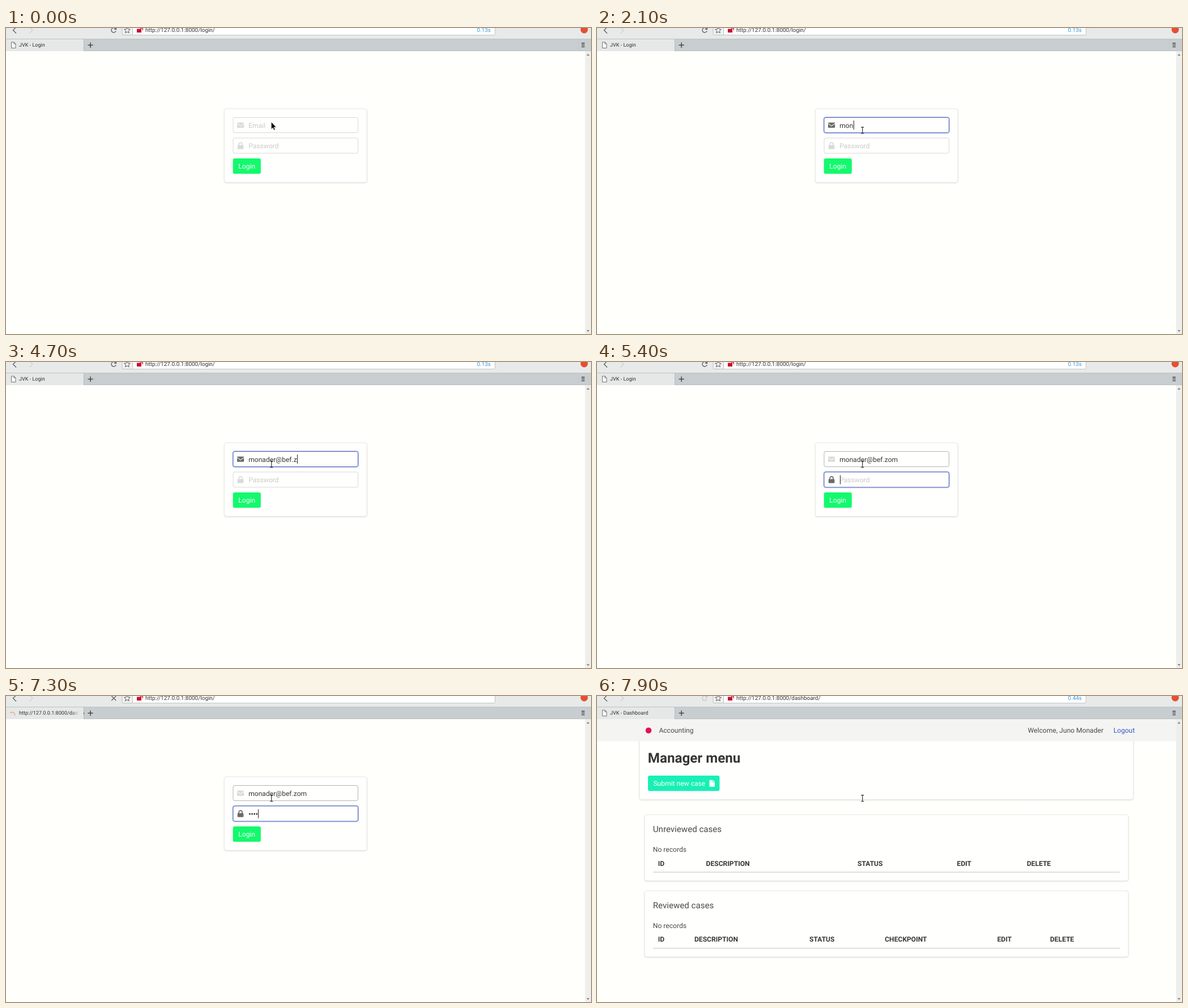
Recreate the animation shown at these times as an HTML page. Size 1033x542 px, loop 8 s.

```html
<!DOCTYPE html>
<html lang="en">
<head>
<meta charset="utf-8">
<title>Login</title>
<style>
  html, body { margin: 0; width: 100%; height: 100%; overflow: hidden; background: #fffffc; }
  svg { display: block; position: absolute; left: 0; top: 0; }
  text { font: 12.1px Roboto, sans-serif; fill: #4a4a4a; text-rendering: geometricPrecision; white-space: pre; }
  .bar { font-size: 9.95px; fill: #333; }
  .tab { font-size: 9.07px; fill: #2e2e2e; }
  .h1 { font-size: 24.2px; font-weight: 700; fill: #363636; }
  .h2 { font-size: 15.1px; }
  .th { font-weight: 700; fill: #363636; }
  .white { fill: #fff; }
  .box { fill: #fffffd; stroke: #e3e3e0; stroke-width: .8; filter: drop-shadow(0 1.4px 1.1px rgba(10, 10, 10, .13)); }
  .line { fill: none; stroke: #5c5f60; stroke-width: 1.3; }
  .frame { fill: #fffffd; stroke: #d8d8d6; }
  .glow { fill: none; stroke: #4864d8; stroke-opacity: .28; stroke-width: 3.4; visibility: hidden; }
  .icon { fill: #dadada; color: #dadada; }
  .value { fill: #363636; }
  .hover .frame { stroke: #b3b3b1; }
  .focus .frame { stroke: #465cb8; }
  .focus .glow { visibility: visible; }
  .focus .icon { fill: #6a6a6a; color: #6a6a6a; }
  .filled .value { fill: #363636; }
  .empty .value { fill: #c9c9c8; }
</style>
</head>
<body>
<svg width="1033" height="542" viewBox="0 0 1033 542">
  <rect width="1033" height="542" fill="#fffffc"/>

  <g id="chrome">
    <rect width="1033" height="19" fill="#e8eae9"/>
    <rect y="19" width="1033" height="22" fill="#c8cdd0"/>
    <path d="M0 19.5H1033M0 40.5H1033" stroke="#b9bec0" stroke-width=".8"/>
    <rect y="20" width="137" height="21" fill="#e6e8e7"/>
    <path d="M137.5 19V41" stroke="#aeb3b5" stroke-width=".8"/>
    <path class="line" d="M18-1.5L12.5 4L18 9.5"/>
    <path class="line" d="M41.5-1.5L47 4L41.5 9.5" style="stroke:#cfd1d0"/>
    <path id="reload" class="line" d="M193.7 1.4A4.2 4.2 0 1 0 194.2 5.2M194.5-1V2.3H191"/>
    <path id="stop" class="line" d="M186.3 0L194.3 8M194.3 0L186.3 8"/>
    <path d="M205-4V10.5Q205 12.5 207 12.5H223.5V-4Z" fill="#f0f1f0" stroke="#b4b8b9" stroke-width=".8"/>
    <path d="M214-1.5L215.6 2L219.3 2.4L216.5 4.9L217.3 8.7L214 6.8L210.7 8.7L211.5 4.9L208.7 2.4L212.4 2Z" fill="none" stroke="#555" stroke-width="1"/>
    <path d="M223.5-4V12.5H861.5Q863.5 12.5 863.5 10.5V-4Z" fill="#fff" stroke="#b4b8b9" stroke-width=".8"/>
    <path d="M231 1.5H239V8H231Z" fill="#c8102e"/>
    <path d="M238 2V0H241.3V4" fill="none" stroke="#c8102e" stroke-width="1.3"/>
    <text id="url" class="bar" x="246" y="7"></text>
    <text id="timing" class="bar" x="856" y="7" text-anchor="end" style="fill:#3c9bd6"></text>
    <circle cx="1021" cy="3" r="6.5" fill="#e5502f"/>
    <path id="doc" d="M9.5 25H14L17 28V35.5H9.5ZM14 25V28H17" fill="#fafafa" stroke="#666" stroke-width=".9"/>
    <path id="spinner" d="M15 25.2A5.2 5.2 0 0 0 15 34.8" fill="none" stroke="#ef9a70" stroke-width="1.2"/>
    <text id="tab" class="tab" x="23" y="33.3"></text>
    <linearGradient id="fade"><stop offset="0" stop-color="#e6e8e7" stop-opacity="0"/><stop offset=".65" stop-color="#e6e8e7"/></linearGradient>
    <rect x="115" y="22" width="22" height="17" fill="url(#fade)"/>
    <rect x="137.9" y="20" width="60" height="20" fill="#c8cdd0"/>
    <path class="line" d="M144.5 30.3H153.7M149.1 25.7V34.9" style="stroke:#333"/>
    <path class="line" d="M1016.3 27H1021.7M1016.3 30.2H1021.7M1016.3 33.4H1021.7" style="stroke:#333"/>
    <rect x="1022.5" y="41" width="10.5" height="501" fill="#eeefed"/>
    <path d="M1025 49L1027.8 45.4L1030.6 49ZM1025 535L1027.8 538.6L1030.6 535Z" fill="#8b8d8c"/>
  </g>

  <g id="login">
    <rect class="box" x="385.4" y="143" width="251.8" height="130.4" rx="3.8"/>
    <g id="email">
      <rect class="glow" x="401" y="158.5" width="220.6" height="27" rx="3"/>
      <rect class="frame" x="401" y="158.5" width="220.6" height="27" rx="3"/>
      <g class="icon">
        <path d="M408 168.4Q408 167.4 409 167.4H419.2Q420.2 167.4 420.2 168.4L414.1 172.9Z"/>
        <path d="M408 169.7L414.1 174.2L420.2 169.7V175.7Q420.2 176.7 419.2 176.7H409Q408 176.7 408 175.7Z"/>
      </g>
      <text class="value" x="428.2" y="176.8"></text>
    </g>
    <g id="password">
      <rect class="glow" x="401" y="194.9" width="220.6" height="27" rx="3"/>
      <rect class="frame" x="401" y="194.9" width="220.6" height="27" rx="3"/>
      <g class="icon">
        <rect x="408.8" y="207.6" width="10.6" height="7" rx="1"/>
        <path d="M411.2 208V205.8A2.9 2.9 0 0 1 417 205.8V208" fill="none" stroke="currentColor" stroke-width="1.7"/>
      </g>
      <text class="value" x="428.2" y="213.1"></text>
      <g id="dots" fill="#363636"></g>
    </g>
    <rect id="caret" width="1" height="16" fill="#222"/>
    <rect x="400.7" y="231" width="49.2" height="27.2" rx="3" fill="#13f96d"/>
    <text class="white" x="425.2" y="249.2" text-anchor="middle">Login</text>
  </g>

  <g id="dashboard">
    <rect class="box" x="75" y="70" width="872" height="113.4" rx="3.8"/>
    <rect y="41" width="1022.5" height="39.2" fill="#f4f4f2"/>
    <circle cx="91" cy="61" r="5.3" fill="#e4134f"/>
    <text x="109.4" y="65.3">Accounting</text>
    <text x="894.3" y="65.3" text-anchor="end">Welcome, Juno Monader</text>
    <text x="912" y="65.3" style="fill:#3c58c4">Logout</text>
    <text class="h1" x="89.8" y="118.4">Manager menu</text>
    <rect x="90" y="141" width="126.4" height="27.2" rx="3" fill="#18f0b5"/>
    <text class="white" x="99.4" y="159">Submit new case</text>
    <path d="M198.5 148.8H204V152.8H208V160.8H198.5ZM204.9 148.8L208 151.9H204.9Z" fill="#fff"/>
    <g id="tables"></g>
  </g>

  <path id="arrow" d="M468.5 166.6V179.2L471.3 176.5L473.2 180.9L475.1 180.1L473.2 175.8H477Z" fill="#000" stroke="#fff" stroke-width=".5"/>
  <path id="beam" d="M466.3 175.6H468Q468.8 175.6 468.8 176.6Q468.8 175.6 469.6 175.6H471.3M468.8 176.2V186M466.3 186.5H468Q468.8 186.5 468.8 185.6Q468.8 186.5 469.6 186.5H471.3" fill="none" stroke="#222" stroke-width="1.1"/>
</svg>
<script>
const LOOP = 8000;
const ADDRESS = "monader@bef.zom";
const HOST = "http://127.0.0.1:8000/";

// time, number of characters in the field
const EMAIL_KEYS = [[1800, 1], [2000, 2], [2100, 3], [2200, 4], [2300, 5], [2500, 6], [2700, 7],
  [3400, 8], [4000, 9], [4200, 10], [4300, 11], [4700, 13], [4900, 14], [5200, 15]];
const PASS_KEYS = [[6000, 1], [6400, 2], [6700, 3], [6900, 4]];
// time, caret shown
const CARET = [[0, 0], [1000, 1], [1500, 0], [1800, 1], [3200, 0], [3400, 1], [3900, 0], [4000, 1],
  [5800, 0], [6000, 1], [7400, 0]];

const $ = id => document.getElementById(id);
const show = (id, on) => { $(id).style.visibility = on ? "visible" : "hidden"; };
const at = (steps, t) => steps.reduce((v, [time, next]) => t >= time ? next : v, 0);
const put = (el, s) => { if (el.textContent !== s) el.textContent = s; };

function add(parent, tag, attrs, content = "") {
  const el = document.createElementNS("http://www.w3.org/2000/svg", tag);
  for (const key in attrs) el.setAttribute(key, attrs[key]);
  el.textContent = content;
  parent.append(el);
  return el;
}

function addTable(y, title, columns) {
  const g = add($("tables"), "g", { transform: `translate(0 ${y})` });
  add(g, "rect", { class: "box", x: 84, y: 0, width: 854.2, height: 117, rx: 3.8 });
  add(g, "text", { class: "h2", x: 98.8, y: 30.6 }, title);
  add(g, "text", { x: 98.8, y: 66 }, "No records");
  for (const [x, name] of columns) add(g, "text", { class: "th", x, y: 90.3 }, name);
  add(g, "path", { d: "M99 101.7H923", stroke: "#d6d6d4", "stroke-width": 1.5 });
}

addTable(210.3, "Unreviewed cases",
  [[107.8, "ID"], [192.6, "DESCRIPTION"], [460, "STATUS"], [635.6, "EDIT"], [759, "DELETE"]]);
addTable(345.1, "Reviewed cases",
  [[107.8, "ID"], [172, "DESCRIPTION"], [375, "STATUS"], [508.2, "CHECKPOINT"], [706.8, "EDIT"], [800, "DELETE"]]);

const PITCH = 4.15;
const dots = [0, 1, 2, 3].map(i => add($("dots"), "circle", { cx: 430.4 + i * PITCH, cy: 209, r: 1.45 }));
const emailText = $("email").querySelector("text");
const passText = $("password").querySelector("text");

function render(t) {
  const inEmail = t >= 300 && t < 5400;
  const inPass = t >= 5400;
  const typed = at(EMAIL_KEYS, t);
  const marks = at(PASS_KEYS, t);
  const loading = t >= 7300 && t < 7900;
  const arrived = t >= 7800;

  $("email").setAttribute("class", (inEmail ? "focus " : inPass ? "hover " : "") + (typed ? "filled" : "empty"));
  $("password").setAttribute("class", (inPass ? "focus " : "") + "empty");
  put(emailText, typed ? ADDRESS.slice(0, typed) : "Email");
  put(passText, marks ? "" : "Password");
  dots.forEach((dot, i) => dot.setAttribute("display", i < marks ? "inline" : "none"));

  $("login").style.display = arrived ? "none" : "inline";
  $("dashboard").style.display = arrived ? "inline" : "none";

  const caretX = inPass ? 428.6 + marks * PITCH : 428.6 + (typed && !arrived ? emailText.getComputedTextLength() : 0);
  $("caret").setAttribute("x", Math.round(caretX));
  $("caret").setAttribute("y", inPass ? 200.5 : 164);
  show("caret", !arrived && at(CARET, t));

  put($("url"), HOST + (arrived ? "dashboard/" : "login/"));
  put($("timing"), t >= 7900 ? "0.44s" : loading ? "" : "0.13s");
  put($("tab"), arrived ? "JVK - Dashboard" : loading ? HOST + "dashboard/" : "JVK - Login");
  show("stop", loading);
  show("reload", !loading);
  $("reload").style.stroke = arrived ? "#c4c7c6" : "#5c5f60";
  show("doc", !loading);
  show("spinner", loading);
  const turn = (Math.floor(t / 100) - 77) * 60;
  $("spinner").setAttribute("transform", `rotate(${turn} 12.6 30)`);

  show("arrow", t < 500);
  show("beam", t >= 500);
  $("beam").setAttribute("transform", `translate(0 ${t < 600 ? -1 : 0})`);
}

function tick(now) {
  render(now % LOOP);
  requestAnimationFrame(tick);
}
render(0);
requestAnimationFrame(tick);
</script>
</body>
</html>
```
